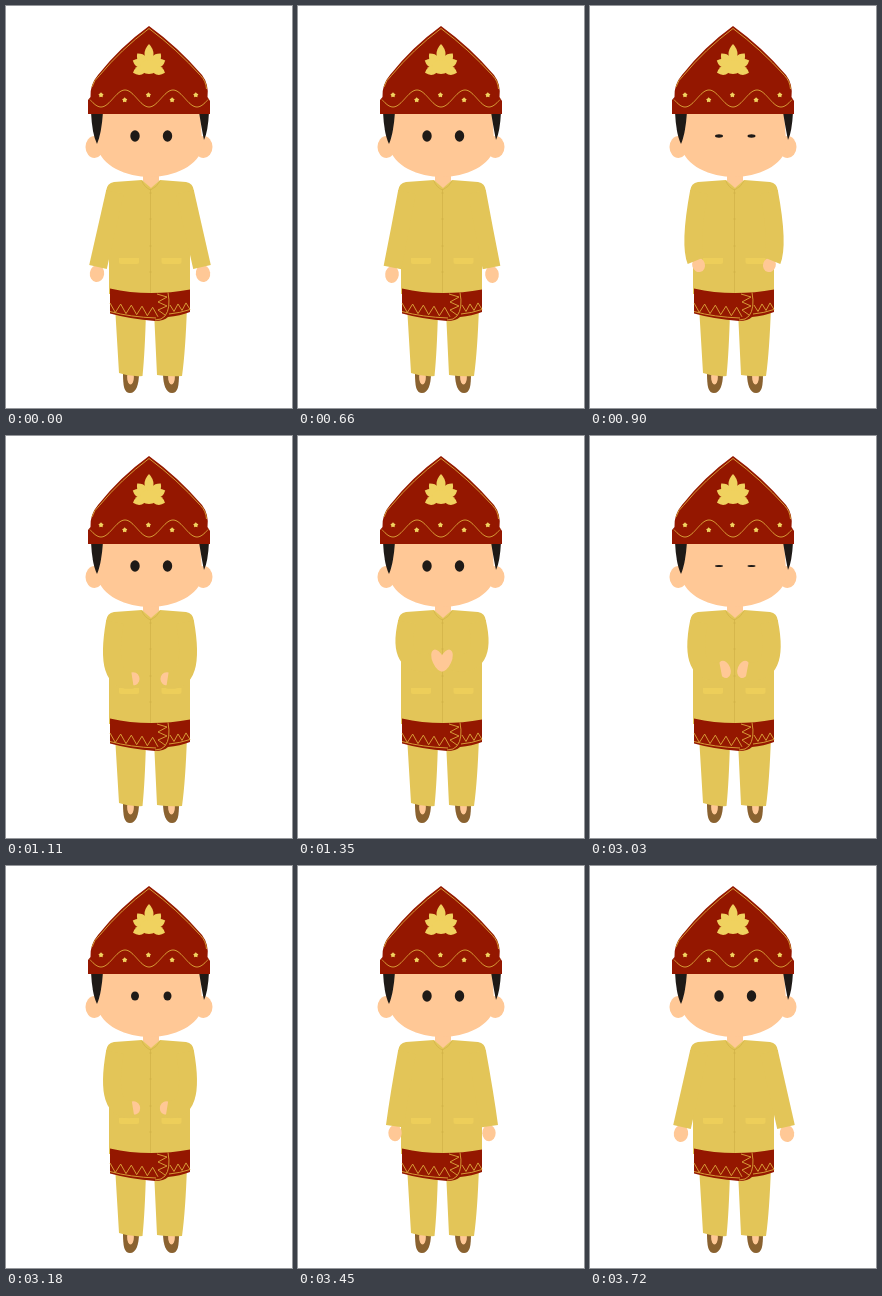
Animation of 286 by 402 pixels, one loop 3.75 s. Source, as an HTML page:

```html
<!DOCTYPE html>
<html lang="en">
<head>
<meta charset="utf-8">
<title>Greeting</title>
<style>
html, body { margin: 0; width: 100%; height: 100%; overflow: hidden; background: #fff; }
svg { display: block; width: 100vw; height: 100vh; }
.skin { fill: #ffc896; }
.cloth { fill: #e3c558; }
.red { fill: #941700; }
.gold { fill: #f0d25f; }
.pocket { fill: #edce5a; }
.dark { fill: #1e1a17; }
.shoe { fill: #8a6230; }
.trim { fill: none; stroke: #dda83c; stroke-width: .9; }
.seam { fill: none; stroke: #d3b44a; stroke-width: .8; }
.button { fill: #d3b44a; }
.sleeve { fill: none; stroke: #e3c558; stroke-width: 18; }
</style>
</head>
<body>
<svg viewBox="0 0 286 402">
  <g id="legs">
    <path class="shoe" d="M117 367H133C133 379 130 387 124 387S117 380 117 367Z"/>
    <path class="shoe" d="M173 367H157C157 379 160 387 166 387S173 380 173 367Z"/>
    <ellipse class="skin" cx="124.5" cy="371" rx="3.4" ry="7.5"/>
    <ellipse class="skin" cx="165.5" cy="371" rx="3.4" ry="7.5"/>
    <path class="cloth" d="M109 300L113 367Q124 371 136.500 370Q139 345 140 305ZM148 305L151 369Q164 371 176 370Q179.500 345 181 300Z"/>
  </g>
  <g id="body">
    <path class="skin" d="M137 160H153V175L145 183L137 175Z"/>
    <path class="cloth" d="M100 185Q101 177 108 176L136 174L145 182L154 174L180 176Q187 177 188 185L184 196V288H103V196Z"/>
    <path class="seam" d="M136 175Q138 181 144.500 184Q151 181 154 175M144.500 183V287"/>
    <path class="pocket" d="M113 252H133V256Q133 258 131 258H115Q113 258 113 256ZM155.500 252H175.500V256Q175.500 258 173.500 258H157.500Q155.500 258 155.500 256Z"/>
    <path class="red" d="M104 282.500Q124 287 145 287Q165 287 184 283.500V306Q174 310 162 311Q158 315 149 315Q124 313 104 307.500Z"/>
    <path class="trim" d="M162 286.500Q165 302 159 310Q156 314 149 314M104 305.500Q124 311 150 312M163 308Q174 307 184 303.500"/>
    <path id="hem" class="trim"/>
  </g>
  <g id="arms"></g>
  <g id="head">
    <ellipse class="skin" cx="88.500" cy="141" rx="9" ry="11"/>
    <ellipse class="skin" cx="197.500" cy="141" rx="9" ry="11"/>
    <path class="skin" d="M95 104H194Q195 122 196.500 140C194 160 167 171 144 171S94 160 91.500 140Q96 122 95 104Z"/>
    <path class="dark" d="M85 106H97Q95.500 128 91 138Q86 128 85 106ZM203 106H193Q195.500 122 198 134Q202 126 203 106Z"/>
    <ellipse class="dark eye" cx="129" cy="130"/>
    <ellipse class="dark eye" cx="161.500" cy="130"/>
    <path class="red" d="M82 108V94L84.500 91Q84 78 92 69Q114 41 143 20Q172 41 196 69Q203 78 201.500 91L204 95V108Z"/>
    <path class="trim" d="M86 81Q88 74 93.500 69.500Q115 43.500 143 22.500Q171 43.500 194.500 69.500Q200 75 200.500 83"/>
    <path id="wave" class="trim"/>
    <g id="lotus" class="gold"></g>
    <g id="stars" class="gold"></g>
  </g>
</svg>
<script>
const LOOP = 3750, STEP = 30;
const $ = q => document.querySelector(q);

function add(parent, tag, attrs) {
  const el = document.createElementNS('http://www.w3.org/2000/svg', tag);
  for (const k in attrs) el.setAttribute(k, attrs[k]);
  return parent.appendChild(el);
}

const line = pts => 'M' + pts.map(p => p.map(v => v.toFixed(2)).join(' ')).join('L');

// Hat ornaments
const wave = [];
for (let x = 84; x <= 202; x++) wave.push([x, 92.5 - 8.5 * Math.cos((x - 119) * Math.PI / 24)]);
$('#wave').setAttribute('d', line(wave));

for (let i = 0; i < 5; i++) {
  const pts = [];
  for (let k = 0; k < 10; k++) {
    const r = k % 2 ? 1.8 : 2.7, a = k * Math.PI / 5;
    pts.push([95 + i * 23.7 + r * Math.sin(a), (i % 2 ? 94 : 89) - r * Math.cos(a)]);
  }
  add($('#stars'), 'path', { d: line(pts) + 'Z' });
}

function petal(turn, len) {
  add($('#lotus'), 'path', {
    d: `M0 0Q-9 ${-len * 0.6} 0 ${-len}Q9 ${-len * 0.6} 0 0Z`,
    transform: `translate(143 61) rotate(${turn})`
  });
}
petal(0, 23);
for (const [turn, len] of [[41, 18], [68, 17.5], [110, 17]]) {
  petal(turn, len);
  petal(-turn, len);
}
add($('#lotus'), 'ellipse', { cx: 143, cy: 61, rx: 9, ry: 7 });

// Hem zigzag on both sides of the fold
function zigzag(x0, x1, n, base, depth) {
  const pts = [];
  for (let i = 0; i <= n; i++) {
    const x = x0 + (x1 - x0) * i / n;
    pts.push([x, base(x) + (i % 2 ? depth : 0)]);
  }
  return line(pts);
}
$('#hem').setAttribute('d',
  zigzag(104, 152, 9, x => 297 + (x - 104) * 0.1, 9) +
  zigzag(164, 184, 5, x => 299 - (x - 164) * 0.13, 7) +
  'M151 288L161 291L152 296L161 300L152 304L159 309');

for (const cy of [187, 213, 240, 266]) add($('#body'), 'circle', { class: 'button', cx: 144.5, cy, r: 1 });

// Arm pose: bend x y, wrist x y, hand x y, hand radii, hand tilt
const poses = [
  [100.5, 223.5, 92, 261, 91, 267.5, 7.2, 8.5, 8],
  [102, 224, 94.5, 261.5, 94, 268.5, 6.8, 8.5, 6],
  [100, 234, 102.5, 257, 104, 262.5, 6.5, 7.5, -10],
  [98, 246, 114, 249.5, 118, 251, 6.2, 6.8, -30],
  [98, 248, 126.5, 243.5, 127.3, 242.7, 6.2, 6.6, -20],
  [98, 232, 133, 226, 140.3, 224.5, 5.8, 11.6, -24]
];
const join = [465, 660, 850, 990, 1110, 1350];
const part = [2775, 3195, 3290, 3380, 3500, 3720];
const reversed = poses.slice().reverse();

// Smooth interpolation, at rest at both ends
function track(times, keys, t) {
  const last = times.length - 1;
  if (t <= times[0]) return keys[0];
  if (t >= times[last]) return keys[last];
  let i = 0;
  while (t > times[i + 1]) i++;
  const h = times[i + 1] - times[i], s = (t - times[i]) / h;
  const slope = (j, c) => j === 0 || j === last ? 0 :
    (keys[j + 1][c] - keys[j - 1][c]) / (times[j + 1] - times[j - 1]);
  return keys[i].map((a, c) => {
    const b = keys[i + 1][c], e = s * s * (3 - 2 * s);
    return a + (b - a) * e +
      h * s * (1 - s) * ((1 - s) * slope(i, c) - s * slope(i + 1, c));
  });
}

const arms = ['', 'translate(288 0) scale(-1 1)'].map(transform => {
  const g = add($('#arms'), 'g', { transform });
  return {
    hand: add(g, 'ellipse', { class: 'skin' }),
    sleeve: add(g, 'path', { class: 'sleeve' })
  };
});
const eyes = document.querySelectorAll('.eye');

const lid = (t, from, to) =>
  t <= from || t >= to ? 0 : Math.sin((t - from) / (to - from) * Math.PI);

function draw(t) {
  const [bx, by, wx, wy, hx, hy, rx, ry, tilt] =
    t < 2000 ? track(join, poses, t) : track(part, reversed, t);
  for (const { hand, sleeve } of arms) {
    sleeve.setAttribute('d', `M109 186Q${bx} ${by} ${wx} ${wy}`);
    hand.setAttribute('rx', rx);
    hand.setAttribute('ry', ry);
    hand.setAttribute('transform', `translate(${hx} ${hy}) rotate(${tilt})`);
  }
  const shut = Math.max(lid(t, 670, 1000), lid(t, 2750, 3220));
  for (const eye of eyes) {
    eye.setAttribute('rx', 4.7 - 0.7 * Math.min(1, shut * 4));
    eye.setAttribute('ry', 5.8 - 5 * shut);
  }
}

const start = performance.now();
function tick() {
  const t = (performance.now() - start) % LOOP;
  draw(Math.floor(t / STEP) * STEP);
  requestAnimationFrame(tick);
}
draw(0);
requestAnimationFrame(tick);
</script>
</body>
</html>
```
